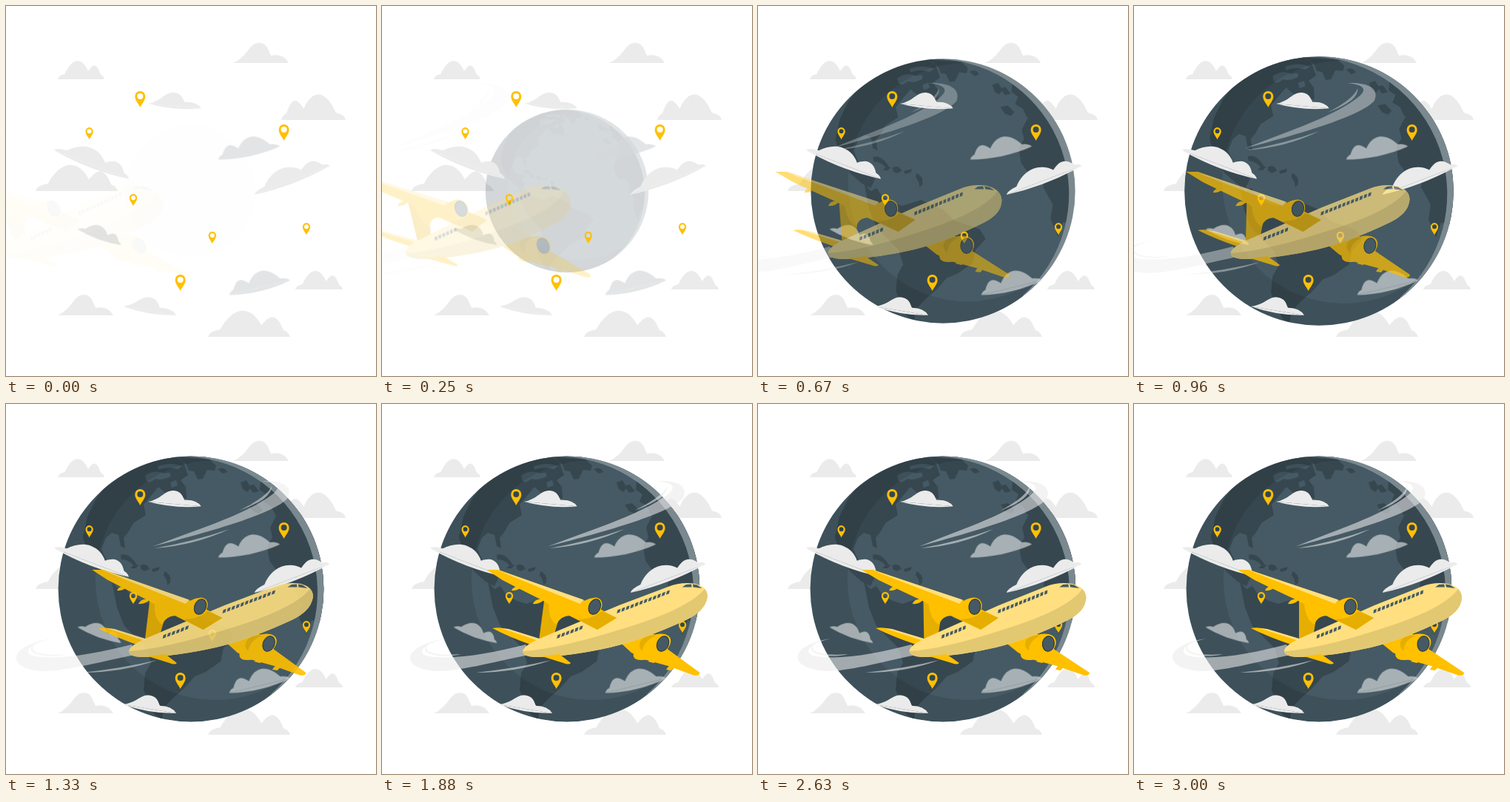
An HTML page that plays this animation: 500 px wide and 500 px high, repeating every 3.04 s.

```html
<!DOCTYPE html>
<html lang="en">
<head>
<meta charset="utf-8">
<title>Flight around the globe</title>
<style>
html, body { margin: 0; width: 100%; height: 100%; overflow: hidden; background: #fff; }
svg { display: block; width: 100%; height: 100%; }
</style>
</head>
<body>
<svg viewBox="0 0 500 500">
  <defs>
    <path id="double" d="M0 0Q2-7 15-9C22-22 32-32 42-32S60-24 65-14C70-20 74-24 78-24C86-24 90-12 92-8Q98-6 100 0Z"/>
    <path id="single" d="M0 0Q8-3 14-9C24-15 32-36 46-36S62-26 68-13Q90-18 100 0Z"/>
    <path id="belly" d="M0 0Q50 13 100 0Z"/>
    <g id="doubleBent"><use href="#double"/><use href="#belly"/></g>
    <g id="singleBent"><use href="#single"/><use href="#belly"/></g>
    <path id="pin" fill-rule="evenodd" d="M0 15C-2 10-7 6-7 0A7 7 0 0 1 7 0C7 6 2 10 0 15ZM-4 0A4 4 0 0 0 4 0A4 4 0 0 0-4 0Z"/>
    <clipPath id="disc"><circle cx="250" cy="250" r="179.4"/></clipPath>
  </defs>

  <g id="back" fill="#ebebeb"></g>

  <g id="globe" clip-path="url(#disc)">
    <circle cx="250" cy="250" r="180" fill="#455a64"/>
    <g fill="#37474f">
      <!-- North America -->
      <path d="M150 60H215L240 79L246 96L236 103L243 112L244 128L220 124L206 112L196 124L186 136L189 150L172 161L166 172L159 181L161 195L155 192L152 177L143 174L135 181L129 196L135 210L143 216L152 212L156 218L150 226L158 234L152 246L140 240L124 226L110 202L104 180L110 152L122 128L140 104Z"/>
      <!-- South America -->
      <path d="M143 240L152 250L160 246L168 258L182 266L195 270L220 262L250 275L265 290L300 302L308 315L294 330L290 348L270 362L255 368L240 385L226 397L213 411L211 426L202 421L194 406L186 386L188 364L196 350L190 330L175 315L160 300L150 275Z"/>
      <!-- Caribbean -->
      <path d="M155 204Q166 200 176 216L173 219Q166 210 156 210ZM168 222L174 216L179 218L175 222ZM182 218Q190 214 194 223L187 226L182 223ZM197 223L208 220L206 225L198 227ZM214 226Q224 230 222 241L218 245Q218 236 213 232Z"/>
      <!-- Greenland and Iceland -->
      <path d="M232 72L275 75L284 83L282 90L272 89L266 101L259 102L254 91L247 90L244 82ZM286 88Q295 84 299 92L293 94Z"/>
      <!-- Europe -->
      <path d="M317 106L325 103L329 110L335 109L342 118L334 120L330 114L326 119L320 115ZM344 104L362 110L395 145L372 152L364 150L358 138L348 132L352 122L343 116ZM328 136L338 134L347 143L342 148L334 145Z"/>
      <!-- Africa -->
      <path d="M365 151L440 140V300L413 292L406 312L396 288L399 268L386 245L388 232L378 225L364 223L356 212L353 192L360 180L357 167Z"/>
    </g>
    <path fill="#455a64" d="M188 97Q200 88 214 94Q224 90 222 98Q210 104 202 101Q194 108 190 104ZM205 84Q222 78 238 84L232 88Q218 84 206 89ZM222 106L230 103L232 110L224 113Z"/>
    <path fill-rule="evenodd" fill="#000" opacity=".1" d="M60 60H440V440H60ZM121 238A162 162 0 1 0 445 238A162 162 0 1 0 121 238Z"/>
    <path fill="#7a898f" d="M245 60H440V392H358A183 183 0 0 0 245 71Z"/>
  </g>

  <g id="front" fill="#ebebeb"></g>
  <g id="haze" fill="#d5d8da" opacity=".69"></g>
  <g id="pins" fill="#ffc000"></g>

  <g id="plane">
    <g fill="#ebebeb" opacity=".58">
      <path d="M97 317C62 325 60 339 78 341C113 346 160 337 206 325L212 339C160 350 120 361 91 361C37 358 39 326 97 317Z"/>
      <path d="M75 323C66 334 80 341 120 338C92 345 58 337 75 323Z"/>
      <path d="M143 363Q198 357 243 346Q198 363 143 363Z"/>
      <path d="M218 192.500C270 172 335 150 365 127C384 114 380 107 355 104C387 103 398 113 392 128C375 148 300 171 218 192.500Z"/>
      <path d="M329 144Q365 125 369 111Q372 128 329 144Z"/>
      <path d="M221 195Q275 185 319 169Q275 191 221 195Z"/>
    </g>

    <!-- tail -->
    <path fill="#e6ae00" d="M223 266L242 276L246 290L243 309L223 319Z"/>
    <path fill="#ffc000" d="M230 270L264 286Q248 285 244 298Q232 292 230 270Z"/>
    <path fill="#ffc000" d="M158 303Q166 301 178 304L236 321L215 326Q182 315 158 303Z"/>
    <path fill="#ffdf80" d="M170 303L180 304L236 321L230 322.500Z"/>

    <!-- near wing -->
    <path fill="#ffc000" d="M328 318L365 300L398 331L446 363Q446 368 438 366.500L402 354L372 346L350 336Z"/>
    <g fill="#ffc000">
      <path d="M374 348Q382 342 392 345L382 350ZM400 359Q404 350 413 353L407 360Z"/>
      <path d="M357 325Q372 308 392 311Q403 314 401 325Q397 338 386 337Q384 346 366 346Q346 347 357 325Z"/>
    </g>
    <path fill="#e6ae00" d="M361 319Q368 311 381 313Q366 318 364 334Q357 327 361 319Z"/>

    <!-- fuselage -->
    <path fill="#ffdf80" d="M203 334Q203 326 228 315L248 306L325 272L388 247Q405 240 425 243Q443 248 443 262Q442 280 418 292Q365 318 320 329Q268 341 225 342Q204 342 203 334Z"/>
    <path fill="#e3c872" d="M203 334Q250 331 330 305Q418 278 438 250Q443 255 443 262Q442 280 418 292Q365 318 320 329Q268 341 225 342Q204 342 203 334Z"/>
    <path fill="#ffc000" d="M230 341L253 338L270 350Q268 353 260 350Z"/>
    <path id="windows" fill="#455a64"/>
    <path fill="#455a64" d="M407 247.5L412 244L419 243.5L420 247.5ZM421 243.5L427 244.5L434 249L422 247.6Z"/>

    <!-- far wing -->
    <path fill="#ffc000" d="M140 224L156 224L276 265L324 289L300 305L270 291L249 281L220 265L188 250L163 238Z"/>
    <path fill="#ffdf80" d="M154 224L276 264.500L272 270L168 230Z"/>
    <path fill="#e6ae00" d="M272 291Q292 291 303 280L324 289L300 305Z"/>
    <path fill="#ffc000" d="M177 252Q180 245 190 247Q186 253 177 252ZM208 270Q212 262 223 264Q218 271 208 270ZM238 286Q242 279 253 282Q248 289 238 286Z"/>
    <path fill="#ffc000" d="M264 278Q275 263 292 261.5Q303 263 302 275Q299 287 290 287Q278 293 264 278Z"/>

    <g fill="#455a64" stroke="#263238">
      <ellipse cx="292.3" cy="274" rx="8" ry="10.3" transform="rotate(8 292 274)"/>
      <ellipse cx="391" cy="324" rx="8" ry="10.3" transform="rotate(8 391 324)"/>
    </g>
  </g>
</svg>
<script>
const $ = id => document.getElementById(id);

// Each cloud: shape, x, y, horizontal scale, vertical scale, angle
const clouds = {
  back: [
    ['double', 70, 99, .63, .77, 0], ['double', 40, 250, 1.11, 1.1, 0],
    ['double', 273, 447, 1.11, 1.1, 0], ['double', 391, 383, .64, .78, 0],
    ['double', 459, 154, -.87, 1.08, 0],
    ['single', 307, 77, .75, .76, 0], ['single', 70, 418, .75, .77, 0]
  ],
  front: [
    ['singleBent', 192, 132, .72, .5, 5], ['singleBent', 158, 406, .73, .5, 9.5],
    ['doubleBent', 65, 195, 1.08, .65, 21], ['doubleBent', 336, 255, 1.09, .62, -21]
  ],
  haze: [
    ['doubleBent', 370, 190, -.85, .66, -12], ['doubleBent', 384, 371, -.845, .68, -13.5],
    ['doubleBent', 97, 302, .62, .47, 20]
  ]
};
const pins = [
  [181.3, 122, 1], [375.6, 167, 1], [235.6, 370, 1],
  [112.6, 169.3, .74], [172, 259.2, .74], [278.8, 310, .74], [406, 298.3, .74]
];

const use = (id, x, y, sx, sy = sx, angle = 0) =>
  `<use href="#${id}" transform="translate(${x} ${y}) rotate(${angle}) scale(${sx} ${sy})"/>`;
for (const id in clouds) $(id).innerHTML = clouds[id].map(c => use(...c)).join('');
$('pins').innerHTML = pins.map(p => use('pin', ...p)).join('');

const windowRow = (x, y, count) => Array.from({ length: count }, (_, i) =>
  `M${x + i * 5.75} ${y - i * 2.3}l3.8-1.500l-.6 4.800l-3.800 1.500z`).join('');
$('windows').setAttribute('d', windowRow(247.3, 312.3, 6) + windowRow(324, 278.300, 12));

const bezier = (x1, y1, x2, y2) => x => {
  if (x <= 0) return 0;
  if (x >= 1) return 1;
  const at = (a, b, s) => 3 * a * s * (1 - s) ** 2 + 3 * b * s * s * (1 - s) + s ** 3;
  let lo = 0, hi = 1;
  for (let i = 0; i < 24; i++) {
    const mid = (lo + hi) / 2;
    if (at(x1, x2, mid) < x) lo = mid; else hi = mid;
  }
  return at(y1, y2, lo);
};
const bounce = bezier(.36, -.01, .5, 1.38);
const easeOut = bezier(0, 0, .58, 1);
const mix = (a, b, p) => a + (b - a) * p;
const tan = deg => Math.tan(deg * Math.PI / 180);

const LOOP = 3040, PIVOT = 236;

function draw(t) {
  const zoom = bounce(t / 1000);
  $('globe').setAttribute('opacity', Math.max(0, Math.min(1, zoom)));
  $('globe').setAttribute('transform', `translate(250 250) scale(${mix(.5, 1, zoom)}) translate(-250 -250)`);

  // Fly in, lean back, then settle
  const fly = easeOut(t / 1800);
  const skew = t < 1800 ? mix(tan(20), tan(-10), fly)
    : t < 2400 ? tan(mix(-10, 2, easeOut((t - 1800) / 600)))
    : tan(mix(2, 0, easeOut((t - 2400) / 600)));
  const shift = mix(-250, 0, fly) - skew * PIVOT;
  $('plane').setAttribute('opacity', fly);
  $('plane').setAttribute('transform', `matrix(1 0 ${skew} 1 ${shift} 0)`);
}

const start = performance.now();
function tick() {
  const t = (performance.now() - start) % LOOP;
  draw(Math.max(38, t));
  requestAnimationFrame(tick);
}
tick();
</script>
</body>
</html>
```
